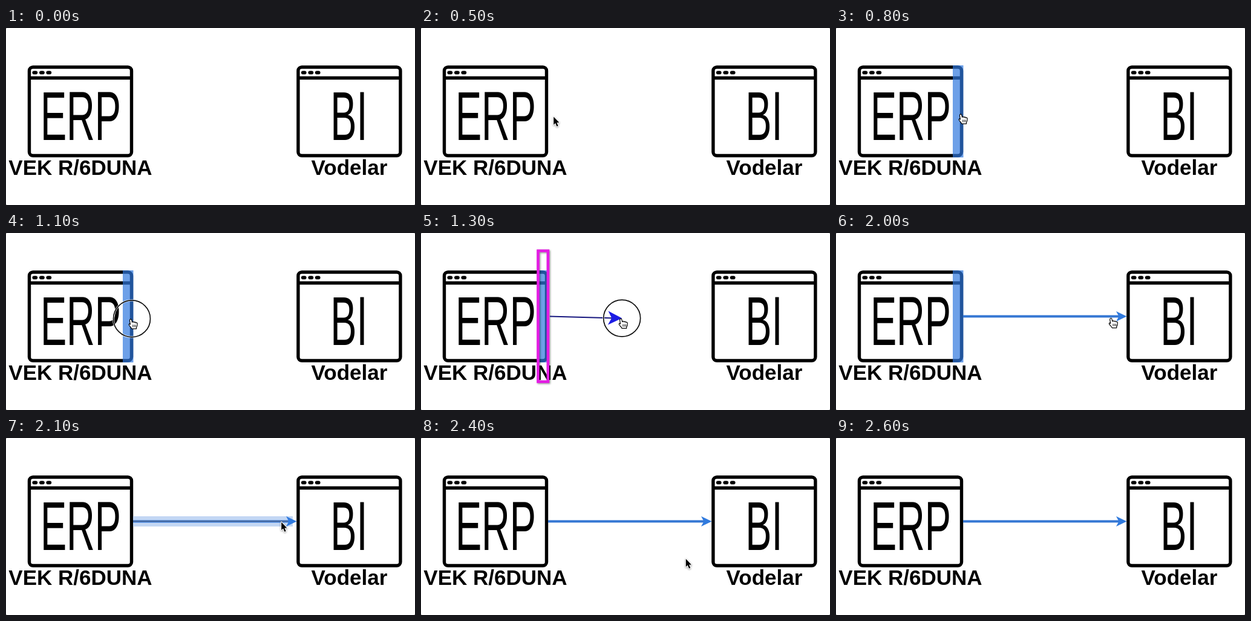
An HTML page with a canvas for the animation above (3.5 s loop, 676 by 294 pixels).

```html
<!DOCTYPE html>
<html lang="en">
<head>
<meta charset="utf-8">
<title>Connecting two applications</title>
<style>
  html, body { margin: 0; width: 100%; height: 100%; overflow: hidden; background: #fff; }
  canvas { display: block; }
</style>
</head>
<body>
<canvas id="stage" width="676" height="294"></canvas>
<script>
const W = 676, H = 294, LOOP = 3500, STEP = 100;
const ctx = document.getElementById('stage').getContext('2d');
const FONT = '"Liberation Sans", Arial, sans-serif';
const CONDENSED = 0.563;
const BLUE = '#3577d3';
const LINK_Y = 138.6, FROM_X = 210, TO_X = 480;
const GRAVITY = 100;

const lerp = (a, b, k) => a + (b - a) * k;
const part = (t, from, to) => Math.min(1, Math.max(0, (t - from) / (to - from)));
const smooth = k => k * k * (3 - 2 * k);

function polygon(points) {
  ctx.beginPath();
  points.forEach(([x, y]) => ctx.lineTo(x, y));
  ctx.closePath();
}

function line(x1, y1, x2, y2, width, color) {
  ctx.beginPath();
  ctx.moveTo(x1, y1);
  ctx.lineTo(x2, y2);
  ctx.lineWidth = width;
  ctx.strokeStyle = color;
  ctx.stroke();
}

function backdrop() {
  ctx.fillStyle = '#fff';
  ctx.fillRect(0, 0, W, H);
  ctx.fillStyle = '#9a9a9a';
  for (const x of [0, W - 1]) for (const y of [0, H - 1]) ctx.fillRect(x, y, 1, 1);
}

function app(x, title, titleX, label) {
  ctx.strokeStyle = ctx.fillStyle = '#000';
  ctx.lineWidth = 5.4;
  ctx.beginPath();
  ctx.roundRect(x + 2.7, 65, 169, 147, 6);
  ctx.stroke();
  line(x + 3, 83, x + 171, 83, 5.4, '#000');
  for (const dx of [12, 23.6, 35]) {
    ctx.beginPath();
    ctx.roundRect(x + dx - 4.4, 71.2, 8.8, 5.8, 2.9);
    ctx.fill();
  }

  ctx.save();
  ctx.translate(titleX, 186);
  ctx.scale(CONDENSED, 1);
  ctx.font = '115px ' + FONT;
  ctx.textAlign = 'left';
  ctx.fillText(title, 0, 0);
  ctx.restore();

  ctx.font = 'bold 35px ' + FONT;
  ctx.textAlign = 'center';
  ctx.fillText(label, x + 87.2, 243.5);
}

function portGlow() {
  ctx.fillStyle = 'rgba(48,120,222,0.7)';
  ctx.fillRect(193, 62, 17.5, 153);
}

function portFrame(x) {
  ctx.save();
  ctx.shadowColor = 'rgba(0,0,0,0.4)';
  ctx.shadowBlur = 3;
  ctx.shadowOffsetX = ctx.shadowOffsetY = 1.5;
  ctx.strokeStyle = '#e41be4';
  ctx.lineWidth = 4.6;
  ctx.strokeRect(x + 2.3, 29.6, 16.4, 217.4);
  ctx.restore();
}

function arrowHead(x, y, length, half, notch, color, angle = 0) {
  ctx.save();
  ctx.translate(x, y);
  ctx.rotate(angle);
  polygon([[0, 0], [-length, -half], [notch - length, 0], [-length, half]]);
  ctx.fillStyle = color;
  ctx.fill();
  ctx.restore();
}

function draftLink(x, y) {
  const start = 213;
  line(start, LINK_Y, x - 10, y, 2, '#16167e');
  arrowHead(x, y, 23, 11.5, 6, '#1c1ce4', Math.atan2(y - LINK_Y, x - start));
}

function link(hovered) {
  if (hovered) {
    ctx.fillStyle = '#c3d7f4';
    ctx.fillRect(FROM_X, 130, 264, 17);
  }
  line(FROM_X, LINK_Y, TO_X - 12, LINK_Y, 4, BLUE);
  if (hovered) line(FROM_X, LINK_Y - 0.4, TO_X - 14, LINK_Y - 0.4, 1.6, '#56698f');
  arrowHead(TO_X + 0.5, LINK_Y, 17.5, 8.5, 4.5, '#307ade');
}

function pressRing(x, y) {
  ctx.beginPath();
  ctx.arc(x, y, 30.5, 0, Math.PI * 2);
  ctx.lineWidth = 3.4;
  ctx.strokeStyle = 'rgba(255,255,255,0.8)';
  ctx.stroke();
  ctx.lineWidth = 1.7;
  ctx.strokeStyle = '#111';
  ctx.stroke();
}

function pointer(x, y) {
  ctx.save();
  ctx.translate(x, y);
  polygon([[0.4, 0.8], [0.4, 14], [3.3, 11.3], [5.6, 16.8], [7.9, 15.8], [5.6, 10.5], [9.6, 10.4]]);
  ctx.lineJoin = 'round';
  ctx.shadowColor = 'rgba(0,0,0,0.4)';
  ctx.shadowBlur = 3;
  ctx.shadowOffsetY = 1;
  ctx.lineWidth = 2;
  ctx.strokeStyle = '#fff';
  ctx.stroke();
  ctx.shadowColor = 'transparent';
  ctx.fillStyle = '#000';
  ctx.fill();
  ctx.restore();
}

function hand(x, y) {
  ctx.save();
  ctx.translate(x, y);
  ctx.beginPath();
  ctx.moveTo(-2.6, 9.5);
  ctx.lineTo(-3.6, 3);
  ctx.bezierCurveTo(-3.6, 0, -0.6, 0, -0.2, 2.6);
  ctx.lineTo(0.6, 6);
  ctx.bezierCurveTo(1, 4.6, 3, 4.7, 3.5, 6.2);
  ctx.bezierCurveTo(4.4, 5, 6.2, 5.4, 6.4, 6.9);
  ctx.bezierCurveTo(7.6, 6, 9.1, 6.7, 9.1, 8.3);
  ctx.bezierCurveTo(9.2, 11.4, 8.6, 13, 7.6, 14.6);
  ctx.lineTo(7.4, 16.8);
  ctx.lineTo(0, 16.8);
  ctx.bezierCurveTo(-1, 14.4, -3.2, 13, -4.6, 10.6);
  ctx.bezierCurveTo(-5.6, 8.6, -3.8, 7.8, -2.6, 9.5);
  ctx.closePath();
  ctx.lineJoin = 'round';
  ctx.fillStyle = '#fff';
  ctx.fill();
  ctx.lineWidth = 1.2;
  ctx.strokeStyle = '#000';
  ctx.stroke();
  for (const dx of [1.7, 4, 6.2]) line(dx, 10, dx, 14, 0.9, '#000');
  ctx.restore();
}

function cursorAt(t) {
  if (t <= 600) {
    const rest = 1 - part(t, 100, 600);
    return [lerp(216, 287, rest ** 2), lerp(146, 236, rest ** 3)];
  }
  if (t < 1100) {
    const k = part(t, 600, 800);
    return [lerp(216, 208, k), lerp(146, 142.4, k)];
  }
  if (t < 2100) {
    const k = smooth(part(t, 1100, 1500));
    return [lerp(208, 456.3, k), lerp(142.4, 140.8, k)];
  }
  const k = part(t, 2200, 2600);
  return [lerp(454.8, 420, k), lerp(139, 300, k ** 1.4)];
}

function draw(t) {
  const [x, y] = cursorAt(t);
  const dragging = t >= 1200 && t < 2000;
  const pressed = t >= 1100 && t < 2000;
  const overPort = t >= 700 && t < 2100;

  backdrop();
  app(35.8, 'ERP', 56.9, 'VEK R/6DUNA');
  app(480.2, 'BI', 536.3, 'Vodelar');
  if (overPort) portGlow();

  if (dragging) {
    const snapped = TO_X - x < GRAVITY;
    portFrame(191.2);
    if (snapped) portFrame(478.6);
    draftLink(snapped ? TO_X : x, snapped ? LINK_Y : y);
  }
  if (t >= 2000) link(t >= 2100 && t < 2300);

  if (pressed) pressRing(x, y);
  if (overPort) hand(x, y);
  else if (t >= 100 && t < 2600) pointer(x, y);
}

function tick() {
  const t = performance.now() % LOOP;
  draw(Math.floor(t / STEP) * STEP);
  requestAnimationFrame(tick);
}
tick();
</script>
</body>
</html>
```
